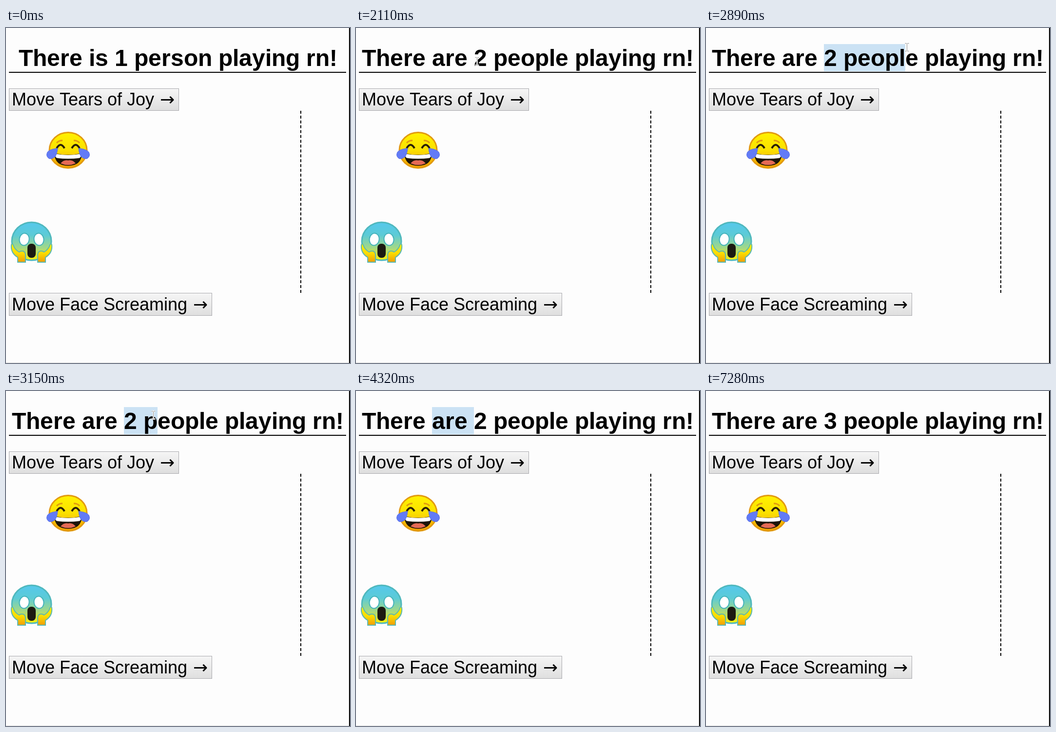
Recreate the animation shown at these times as an HTML page with a canvas. Size 706x688 px, loop 8000 ms.

```html
<!DOCTYPE html>
<html lang="en">
<head>
<meta charset="utf-8">
<title>Emoji race</title>
<style>
  html, body { margin: 0; width: 100%; height: 100%; overflow: hidden; background: #fdfdfd; }
  canvas { display: block; }
</style>
</head>
<body>
<canvas id="stage" width="706" height="688"></canvas>
<script>
const ctx = document.getElementById('stage').getContext('2d');
const LOOP = 8000, ANCHOR = 10;
const SANS = '"Liberation Sans", Arial, sans-serif';
const ARROW = '"DejaVu Sans", sans-serif';

// Pointer path: time, x, y
const pointerPath = [
  [2110, 248, 68], [2210, 248, 68], [2530, 326, 46], [2890, 412, 39], [2960, 412, 39],
  [3290, 222, 56], [3500, 215, 57], [3600, 164, 63], [3730, 164, 63], [3960, 162, 62], [4320, 146, -14]
];

function pointerAt(t) {
  const i = pointerPath.findIndex(p => p[0] > t);
  if (i < 1) return null;
  const [t0, x0, y0] = pointerPath[i - 1], [t1, x1, y1] = pointerPath[i];
  const k = (t - t0) / (t1 - t0);
  return { x: x0 + (x1 - x0) * k, y: y0 + (y1 - y0) * k };
}

function rect(x, y, w, h, color) {
  ctx.fillStyle = color;
  ctx.fillRect(x, y, w, h);
}

function gradient(y0, y1, ...colors) {
  const g = ctx.createLinearGradient(0, y0, 0, y1);
  colors.forEach((c, i) => g.addColorStop(i / (colors.length - 1), c));
  return g;
}

function shape(path, fill, stroke, width = 2) {
  const p = new Path2D(path);
  if (fill) { ctx.fillStyle = fill; ctx.fill(p); }
  if (stroke) { ctx.strokeStyle = stroke; ctx.lineWidth = width; ctx.stroke(p); }
}

function oval(x, y, rx, ry, fill, stroke, width = 2, turn = 0) {
  ctx.beginPath();
  ctx.ellipse(x, y, rx, ry, turn, 0, 7);
  ctx.fillStyle = fill;
  ctx.fill();
  if (stroke) { ctx.strokeStyle = stroke; ctx.lineWidth = width; ctx.stroke(); }
}

// Draws once as is and once mirrored about x = axis
function mirrored(axis, draw) {
  draw();
  ctx.save();
  ctx.translate(2 * axis, 0);
  ctx.scale(-1, 1);
  draw();
  ctx.restore();
}

// Left edge of every character, with whole-pixel advances
function charEdges(text) {
  const widths = [...text].map(c => Math.round(ctx.measureText(c).width));
  let x = Math.round(352.5 - widths.reduce((a, b) => a + b, 0) / 2);
  return [x, ...widths.map(w => x += w)];
}

function heading(t) {
  ctx.font = 'bold 48px ' + SANS;
  const text = t < 500 ? 'There is 1 person playing rn!'
    : `There are ${t < 7280 ? 2 : 3} people playing rn!`;
  const edges = charEdges(text);

  if (t >= 2210 && t < 7280) {
    const p = t < 3730 ? pointerAt(t) : { x: 164 };
    const near = edges.reduce((a, b) => Math.abs(b - p.x + 4) < Math.abs(a - p.x + 4) ? b : a);
    const from = Math.min(near, edges[ANCHOR]);
    const to = Math.max(near, edges[ANCHOR]);
    rect(from, 33, to - from, 56, t < 5680 ? '#cbe2f4' : '#e6e6e6');
  }
  ctx.fillStyle = '#000';
  [...text].forEach((c, i) => ctx.fillText(c, edges[i], 78));
  rect(6, 90, 692, 2, '#000');
}

function button(label, y, w, h) {
  rect(6, y, w, h, gradient(y, y + h, '#f6f6f6', '#dedede'));
  ctx.strokeStyle = '#a9a9ad';
  ctx.lineWidth = 1;
  ctx.strokeRect(6.5, y + .5, w - 1, h - 1);
  ctx.fillStyle = '#000';
  ctx.font = '36px ' + SANS;
  ctx.fillText(label, 12, y + h - 11);
  ctx.font = '36px ' + ARROW;
  ctx.fillText('→', w - 33, y + h - 11);
}

function joyFace() {
  oval(127.5, 251, 38.5, 36.5, gradient(214, 288, '#fff200', '#fbe000', '#f19a00'), '#e29a10', 3);
  shape('M99 257 Q127.5 264 156 257 Q155 283 127.5 283 Q100 283 99 257Z', '#1c1508');
  shape('M100 258 Q127.5 264 155 258 Q155 264 151 267 Q127.5 270 104 267 Q100 264 100 258Z', '#fff');
  shape('M112 278 Q119 270 127.5 272 Q136 270 143 278 Q127.5 285 112 278Z', '#e56a55');
  mirrored(127.5, () => {
    shape('M104 236 Q108 231 116 231', null, '#e09a10', 3);
    shape('M104 247 Q112 233 120 247', null, '#2a2008', 4);
    shape('M106 247 Q105 258 101 264 Q95 270 88 268 Q81 263 85 255 Q89 249 106 247Z', '#627bf6', '#566ee6', 1);
  });
}

function screamFace() {
  oval(52.5, 438, 40.5, 39, gradient(399, 478, '#55c8ec', '#5ccbd6', '#a4d985', '#fff200'), '#4fb8bd', 3);
  oval(37.5, 434, 10, 12.5, '#fff', '#45b3bd', 2, .15);
  oval(67.5, 434, 10, 12.5, '#fff', '#45b3bd', 2, -.15);
  ctx.beginPath();
  ctx.roundRect(44, 443, 17, 29, 8);
  ctx.fillStyle = '#1c1a12';
  ctx.fill();
  mirrored(52.5, () => shape(
    'M11 445 Q9 462 24 471 L24 481 L40 481 L40 465 Q39 458 33 458 Q29 458 27 460 Q18 455 15 446 Q13 441 11 445Z',
    gradient(444, 481, '#fdee00', '#fbdc00', '#f09c08'), '#5cb8b0', 2));
}

function track() {
  ctx.strokeStyle = '#000';
  ctx.lineWidth = 2;
  ctx.setLineDash([6, 3.946]);
  ctx.beginPath();
  ctx.moveTo(605, 170);
  ctx.lineTo(605, 544);
  ctx.stroke();
  ctx.setLineDash([]);
}

function pointer(t) {
  const p = pointerAt(t);
  if (!p) return;
  ctx.save();
  ctx.translate(Math.round(p.x) + .5, Math.round(p.y) + .5);
  const beam = 'M-4 -8 H-1 L0 -7 L1 -8 H4 M0 -7 V7 M-4 8 H-1 L0 7 L1 8 H4';
  shape(beam, null, '#fff', 3);
  shape(beam, null, '#8c8c8c', 1);
  ctx.restore();
}

function draw(t) {
  rect(0, 0, 706, 688, '#fdfdfd');
  rect(0, 687, 704, 1, '#dedede');
  rect(704, 0, 2, 688, '#000');
  heading(t);
  button('Move Tears of Joy', 124, 349, 46);
  button('Move Face Screaming', 544, 417, 47);
  track();
  joyFace();
  screamFace();
  pointer(t);
}

const start = performance.now();
function tick() {
  draw((performance.now() - start) % LOOP);
  requestAnimationFrame(tick);
}
tick();
</script>
</body>
</html>
```
